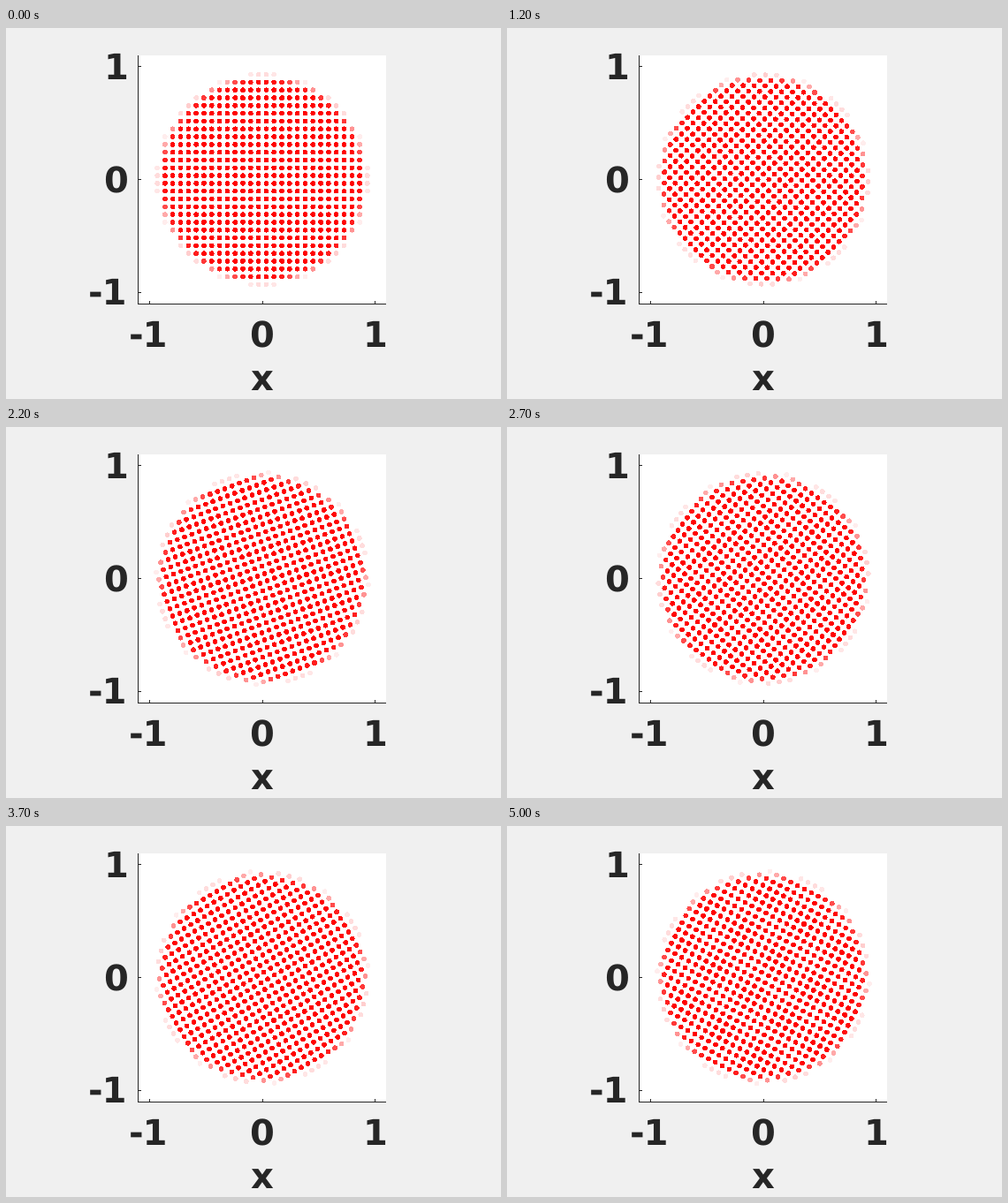
A matplotlib script for the animation above (5100 ms loop, 560 by 420 pixels).

```python
import matplotlib.pyplot as plt
import numpy as np
from matplotlib.animation import FuncAnimation
from matplotlib.patches import Rectangle

plt.rcParams["text.hinting"] = "none"

W, H, DPI = 560, 420, 100
PT = 72 / DPI                  # points per pixel
FRAMES, INTERVAL = 51, 100
CX, CY, UNIT = 290, 171.5, 127.7
STEP = np.radians(-11.345)     # clockwise turn per frame
INK = "#262626"
DOT = 4.6                      # every touched pixel is filled, so dots show 5-6 px wide

fig = plt.figure(figsize=(W / DPI, H / DPI), dpi=DPI, facecolor="#f0f0f0")
ax = fig.add_axes([0, 0, 1, 1])
ax.set_xlim(0, W)
ax.set_ylim(H, 0)
ax.axis("off")


def line(x0, y0, x1, y1):
    ax.plot([x0, x1], [y0, y1], color=INK, lw=PT, solid_capstyle="butt",
            snap=False, zorder=1)


def label(x, y, text):
    ax.text(x, y, text, family="DejaVu Sans", weight="bold", size=40 * PT,
            color=INK, ha="left", va="baseline")


# Plot box, axis lines and inward ticks
ax.add_patch(Rectangle((149, 31), 281, 281, fc="white", lw=0, zorder=0))
line(149.5, 31, 149.5, 313)
line(149, 312.5, 430, 312.5)
for v in (-1, 0, 1):
    tx = np.floor(CX + v * UNIT) + 0.5
    ty = np.floor(CY - v * UNIT) + 0.5
    line(tx, 309, tx, 312)
    line(150, ty, 153, ty)

for v, x, left in ((-1, 139, 93), (0, 275, 110), (1, 403, 110)):
    label(x, 361, str(v))
    label(left, np.floor(CY - v * UNIT + 14.5), str(v))
label(276.4, 410, "x")

# Square lattice whose density falls off smoothly at the rim of a disc
side = np.linspace(-1, 1, 30)
gx, gy = (g.ravel() for g in np.meshgrid(side, side))
density = 0.5 * (1 - np.tanh((np.hypot(gx, gy) - 0.907) / 0.027))
keep = density > 0.06
gx, gy, density = gx[keep], gy[keep], density[keep]

colors = np.zeros((density.size, 4))
colors[:, 0] = 1
colors[:, 3] = density
dots = ax.scatter(gx, gy, s=(DOT * PT) ** 2, c=colors, linewidths=0,
                  antialiased=False, zorder=2)
dots.set_snap(False)


def update(i):
    c, s = np.cos(i * STEP), np.sin(i * STEP)
    x, y = c * gx - s * gy, s * gx + c * gy
    dots.set_offsets(np.column_stack((CX + UNIT * x, CY - UNIT * y)))
    return (dots,)


anim = FuncAnimation(fig, update, frames=FRAMES, interval=INTERVAL,
                     repeat=True, repeat_delay=0)
plt.show()
```
